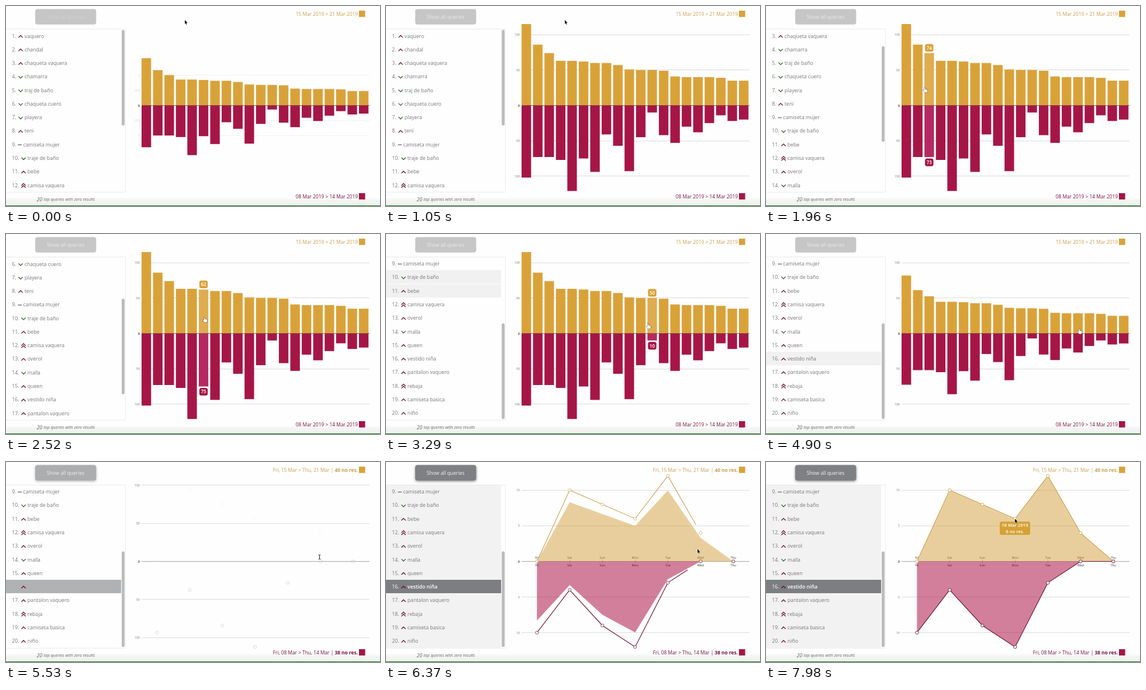
Write an HTML page with a canvas that moves like this. It is 640 px wide and 343 px high and loops after 8 s.

```html
<!DOCTYPE html>
<html lang="es">
<head>
<meta charset="utf-8">
<title>Zero-result queries</title>
<style>
  html, body { margin: 0; width: 100%; height: 100%; overflow: hidden; background: #fff; }
  canvas { display: block; width: 640px; height: 343px; }
</style>
</head>
<body>
<canvas id="stage"></canvas>
<script>
const W = 640, H = 343, LOOP = 8000, STEP = 70;
const canvas = document.getElementById('stage');
const ctx = canvas.getContext('2d');
const dpr = window.devicePixelRatio || 1;
canvas.width = W * dpr;
canvas.height = H * dpr;

const FONT = '"Open Sans", "Noto Sans", sans-serif';
const GOLD = '#d9a239', WINE = '#a51646', DARK_WINE = '#6b0d34';
const BASE = 170.5, LEFT = 232, RIGHT = 622;
const PITCH = 19.58, BAR_W = 16.3, BAR_K = 1.213, LINE_K = 12.22;
const ROW_H = 23.27, LIST_TOP = 40, LIST_BOTTOM = 319, MAX_SCROLL = 186.6;
const SELECTED = 15;

const T = { collapse: 4650, collapsed: 5250, select: 5350, axis: 5400, lines: 5588, tip: 7400 };

// Mark: u = up, U = double up, d = down, - = unchanged
const queries = [
  'u vaquero', 'u chandal', 'u chaqueta vaquera', 'd chamarra', 'd traj de baño',
  'd chaqueta cuero', 'd playera', 'u teni', '- camiseta mujer', 'd traje de baño',
  'u bebe', 'U camisa vaquera', 'u overol', 'd malla', 'u queen',
  'u vestido niña', 'u pantalon vaquero', 'U rebaja', 'u camiseta basica', 'u niño'
].map(s => ({ mark: s[0], name: s.slice(2) }));

const barsUp = [115, 86, 74, 63, 63, 62, 60, 60, 57, 51, 50, 50, 49, 41, 40, 40, 40, 39, 35, 35];
const barsDown = [102, 73, 73, 77, 121, 75, 94, 41, 57, 93, 45, 10, 42, 53, 30, 38, 25, 14, 22, 20];
const days = ['Fri', 'Sat', 'Sun', 'Mon', 'Tue', 'Wed', 'Thu'];
const dayUp = [0, 10, 8, 6, 12, 4, 0];
const dayDown = [10, 4, 9, 12, 3, 0, 0];

// Pointer stops: time, x, y
const path = [
  [0, 306, 24], [1350, 306, 24], [1700, 240, 138], [2520, 339.5, 143], [3900, 534.5, 162.5],
  [5250, 536.5, 163], [6000, 536.5, 163], [6370, 533, 149.3], [6700, 533, 149.3], [7400, 426, 97.3], [8000, 426, 97.3]
];

const clamp = v => Math.max(0, Math.min(1, v));
const mix = (a, b, p) => a + (b - a) * p;
const ramp = (t, start, length) => clamp((t - start) / length);
const cubic = q => q < 0.5 ? 4 * q ** 3 : 1 - 4 * (1 - q) ** 3;
const blend = (a, b, p) => `rgb(${a.map((v, i) => Math.round(mix(v, b[i], p)))})`;
const gray = v => [v, v, v];
const barX = i => LEFT + i * PITCH;
const dayX = i => 258.3 + i * 56;

function text(str, x, y, size, color, align = 'left', style = '') {
  ctx.font = `${style} ${size}px ${FONT}`;
  ctx.textAlign = align;
  ctx.fillStyle = color;
  ctx.fillText(str, x, y);
}

function box(x, y, w, h, color, r = 0) {
  ctx.fillStyle = color;
  ctx.beginPath();
  ctx.roundRect(x, y, w, h, r);
  ctx.fill();
}

function polyline(points, color, width) {
  ctx.beginPath();
  points.forEach(([x, y]) => ctx.lineTo(x, y));
  ctx.strokeStyle = color;
  ctx.lineWidth = width;
  ctx.stroke();
}

function withAlpha(alpha, draw) {
  if (alpha <= 0) return;
  ctx.save();
  ctx.globalAlpha = alpha;
  draw();
  ctx.restore();
}

function pointer(t) {
  let i = 1;
  while (i < path.length - 1 && path[i][0] < t) i++;
  const [t0, x0, y0] = path[i - 1], [t1, x1, y1] = path[i];
  const p = ramp(t, t0, t1 - t0);
  return { x: mix(x0, x1, p), y: mix(y0, y1, p) };
}

function hoveredBar(t) {
  if (t < 1550 || t >= T.collapse) return -1;
  return Math.floor((pointer(t).x - LEFT) / PITCH);
}

// The list follows the hovered bar and stays where it was left.
function scrollAt(t) {
  const i = hoveredBar(Math.min(t, T.collapse - 1));
  return Math.min(Math.max(i, 0) * ROW_H, MAX_SCROLL);
}

function rowGlow(i, t) {
  return hoveredBar(t - 110) === i || hoveredBar(t - 210) === i ? 1 : 0;
}

function drawButton(t) {
  const p = ramp(t, T.select, 500);
  ctx.save();
  ctx.shadowColor = `rgba(0,0,0,${0.45 * Math.sqrt(p)})`;
  ctx.shadowBlur = 4 * dpr;
  ctx.shadowOffsetY = 1.5 * dpr;
  box(50, 5.3, 104.3, 26.5, blend(gray(198), [127, 128, 131], p), 4);
  ctx.restore();
  const label = blend(gray(mix(208, 234, ramp(t, 0, 600))), gray(244), p);
  text('Show all queries', 102, 21.6, 8.5, label, 'center');
}

function chevron(x, y, dir, color) {
  polyline([[x + 0.4, y + 1.8 * dir], [x + 4, y - 1.8 * dir], [x + 7.6, y + 1.8 * dir]], color, 1.3);
}

function drawMark(mark, x, y) {
  if (mark === '-') box(x - 0.7, y - 0.6, 6.6, 1.5, '#777');
  else if (mark === 'd') chevron(x, y + 0.5, -1, '#35602f');
  else if (mark === 'u') chevron(x, y + 0.5, 1, DARK_WINE);
  else {
    chevron(x, y - 1.6, 1, DARK_WINE);
    chevron(x, y + 2, 1, DARK_WINE);
  }
}

function drawList(t) {
  const scroll = scrollAt(t);
  const panel = ramp(t, 5550, 250), sel = ramp(t, T.select, 320);

  box(0, 39, 205, 1, '#e9e9e9');
  box(0, 318.7, 205, 1, '#ececec');
  box(204.2, 39, 0.8, 280, '#e9e9e9');

  ctx.save();
  ctx.beginPath();
  ctx.rect(0, LIST_TOP, 204, LIST_BOTTOM - LIST_TOP);
  ctx.clip();
  withAlpha(panel, () => box(0, LIST_TOP, 197, 279, '#f2f2f2'));
  queries.forEach(({ mark, name }, i) => {
    const y = 51.6 + i * ROW_H - scroll, top = Math.round(y - 12);
    const active = i === SELECTED ? sel : 0;
    const held = i === SELECTED && t >= 3950 && t < T.select;
    if (active) box(0, top, 197, 23, blend(gray(242), [124, 126, 130], active));
    else withAlpha(held ? 1 : rowGlow(i, t), () => box(0, top, 197, 23.3, '#f1f1f1'));
    const x = i < 9 ? 21 : 26;
    const color = blend(gray(119), gray(255), active ** 1.45);
    text(`${i + 1}.`, 10.3, y + 3, 8.7, color);
    drawMark(mark, x, y + 0.2);
    text(name, x + (mark === '-' ? 8.3 : 10.8), y + 3, 8.7, color, 'left', active ? '600' : '');
  });
  ctx.restore();

  box(198, 41 + scroll * 0.602, 5, 164, '#bcbcbc', 2.5);
}

function drawFooter() {
  const g = ctx.createLinearGradient(0, 328, 0, 334);
  g.addColorStop(0, '#fefefe');
  g.addColorStop(1, '#f3f3f3');
  box(0, 328, W, 14, g);
  text('20', 52.5, 334.6, 8.6, '#666', 'left', 'italic');
  text('top queries with zero results', 64.2, 334.4, 7.13, '#666', 'left', 'italic');
  box(0, 342, W, 1, '#0b7c12');
}

function drawLegend(t) {
  const daily = t >= T.collapsed;
  const line = (dates, count, y, color, fill) => {
    let right = 602;
    if (daily) {
      text(count, right, y, 8.35, color, 'right', 'bold');
      right -= ctx.measureText(count).width;
    }
    text(dates, right, y, 8.35, color, 'right');
    box(604, Math.round(y - 8.6), 10.6, 10.8, fill);
  };
  line(daily ? 'Fri, 15 Mar > Thu, 21 Mar | ' : '15 Mar 2019 > 21 Mar 2019', '40 no res.', 16.6, '#c9a050', GOLD);
  line(daily ? 'Fri, 08 Mar > Thu, 14 Mar | ' : '08 Mar 2019 > 14 Mar 2019', '38 no res.', 329.5, '#75123b', WINE);
}

function drawTicks(values, k0, k1, p, alpha) {
  withAlpha(alpha, () => {
    for (const v of values) for (const side of [-1, 1]) {
      const d = mix(v * k0, v * k1, p);
      if (d > 149) continue;
      const y = BASE + side * d;
      box(LEFT, Math.floor(y), RIGHT - LEFT, 1, '#dcdcdc');
      text(String(v), 229, y + 2, 5.5, '#777', 'right');
    }
  });
}

function drawAxis(t) {
  const intro = cubic(ramp(t, -634, 1200)), swap = cubic(ramp(t, T.axis, 1000));
  if (t < T.axis) {
    drawTicks([0.5, 1], 122, BAR_K, intro, 1 - intro);
    drawTicks([50, 100], 122, BAR_K, intro, intro);
  } else {
    drawTicks([50, 100], BAR_K, LINE_K, swap, 1 - swap);
    drawTicks([5, 10], BAR_K, LINE_K, swap, swap);
  }
  text('0', 229, BASE + 2, 5.5, '#333', 'right', '600');
  box(LEFT, Math.floor(BASE), RIGHT - LEFT, 1, '#a4a4a4');
}

function pill(value, x, y, color) {
  box(x - 7.2, y - 6.6, 14.4, 13.2, color, 3.5);
  text(value, x, y + 2.9, 8, '#fff', 'center', '600');
}

function drawBars(t) {
  const grow = cubic(ramp(t, -634, 1200)) * (1 - cubic(ramp(t, T.collapse, T.collapsed - T.collapse)));
  if (grow <= 0) return;
  const hover = hoveredBar(t), k = BAR_K * grow;
  barsUp.forEach((up, i) => {
    const x = barX(i), lit = i === hover;
    box(x, BASE - up * k, BAR_W, up * k, lit ? '#dfac4f' : GOLD);
    box(x, BASE, BAR_W, barsDown[i] * k, lit ? '#b42a60' : WINE);
  });
  box(LEFT, BASE - 0.3, RIGHT - LEFT, 0.6, '#6b3a2c');
  if (hover >= 0 && hover < 20) {
    const x = barX(hover) + BAR_W / 2;
    pill(barsUp[hover], x, BASE - barsUp[hover] * k - 9, GOLD);
    pill(barsDown[hover], x, BASE + barsDown[hover] * k + 9, WINE);
  }
}

function partial(points, share) {
  const lengths = points.slice(1).map(([x, y], i) => Math.hypot(x - points[i][0], y - points[i][1]));
  let left = share * lengths.reduce((a, b) => a + b, 0);
  const out = [points[0]];
  for (let i = 0; i < lengths.length && left > 0; i++) {
    const p = Math.min(1, left / lengths[i]);
    out.push([mix(points[i][0], points[i + 1][0], p), mix(points[i][1], points[i + 1][1], p)]);
    left -= lengths[i];
  }
  return out;
}

function drawArea(values, side, p, color) {
  ctx.beginPath();
  ctx.moveTo(dayX(0), BASE);
  values.forEach((v, i) => ctx.lineTo(dayX(i), BASE + side * v * LINE_K * p));
  ctx.lineTo(dayX(6), BASE);
  ctx.fillStyle = color;
  ctx.fill();
}

function drawSeries(values, side, p, color, dotAlpha) {
  const points = values.map((v, i) => [dayX(i), BASE + side * v * LINE_K]);
  if (p > 0) polyline(partial(points, p), color, 1.1);
  withAlpha(dotAlpha, () => points.forEach(([x, y]) => {
    ctx.beginPath();
    ctx.arc(x, y, 2.6, 0, Math.PI * 2);
    ctx.fillStyle = '#fff';
    ctx.fill();
    ctx.strokeStyle = color;
    ctx.lineWidth = 0.9;
    ctx.stroke();
  }));
}

function drawLines(t) {
  if (t < T.axis) return;
  const p = cubic(ramp(t, T.lines, 1200));
  const dots = ramp(t, 5300, 1300);
  withAlpha(ramp(t, 5600, 300), () => days.forEach((day, i) => {
    text(day, dayX(i), BASE - 4.6, 5.4, '#333', 'center');
    text(day, dayX(i), BASE + 8.6, 5.4, '#333', 'center');
    box(dayX(i) - 0.3, BASE - 3, 0.6, 6, '#888');
  }));
  drawArea(dayUp, -1, p, 'rgba(214,160,62,.5)');
  drawArea(dayDown, 1, p, 'rgba(165,2,58,.5)');
  drawSeries(dayUp, -1, p, '#cba352', dots ** 1.4);
  drawSeries(dayDown, 1, p, DARK_WINE, dots);
  if (t >= T.tip) {
    box(400, 102.3, 52, 22.8, '#d6a136', 3);
    text('18 Mar 2019', 426, 111.2, 7.7, '#fff', 'center', '600');
    text('6 no res.', 426, 121.6, 7.7, '#fff', 'center', '600');
  }
}

function shape(points, fill, line) {
  ctx.beginPath();
  points.forEach(([x, y]) => ctx.lineTo(x, y));
  ctx.closePath();
  ctx.lineWidth = 0.8;
  ctx.strokeStyle = line;
  ctx.stroke();
  ctx.fillStyle = fill;
  ctx.fill();
}

function drawPointer(t) {
  const { x, y } = pointer(t);
  ctx.save();
  ctx.translate(x, y);
  if (t >= T.collapsed && t < 6000) {
    polyline([[-2, -3.8], [0, -3.2], [2, -3.8]], '#222', 0.9);
    polyline([[0, -3.2], [0, 3.2]], '#222', 1);
    polyline([[-2, 3.8], [0, 3.2], [2, 3.8]], '#222', 0.9);
  } else if (hoveredBar(t) >= 0 || (t >= T.collapse && t < T.collapsed)) {
    shape([[-0.7, 0], [0.7, 0], [0.9, 2.8], [4.6, 3.8], [4.8, 6], [3.8, 8.6], [0, 8.6],
      [-3, 5], [-2.4, 4.2], [-0.8, 5.2]], '#fff', '#222');
  } else {
    shape([[0, 0], [0, 6.8], [1.5, 5.5], [2.6, 8], [3.7, 7.5], [2.6, 5.1], [4.7, 5]], '#111', '#fff');
  }
  ctx.restore();
}

function render(t) {
  ctx.setTransform(dpr, 0, 0, dpr, 0, 0);
  box(0, 0, W, H, '#fefefe');
  drawFooter();
  drawButton(t);
  drawList(t);
  drawAxis(t);
  drawBars(t);
  drawLines(t);
  drawLegend(t);
  drawPointer(t);
}

const start = performance.now();
function loop() {
  const t = (performance.now() - start) % LOOP;
  render(Math.floor(t / STEP) * STEP);
  requestAnimationFrame(loop);
}
loop();
</script>
</body>
</html>
```
